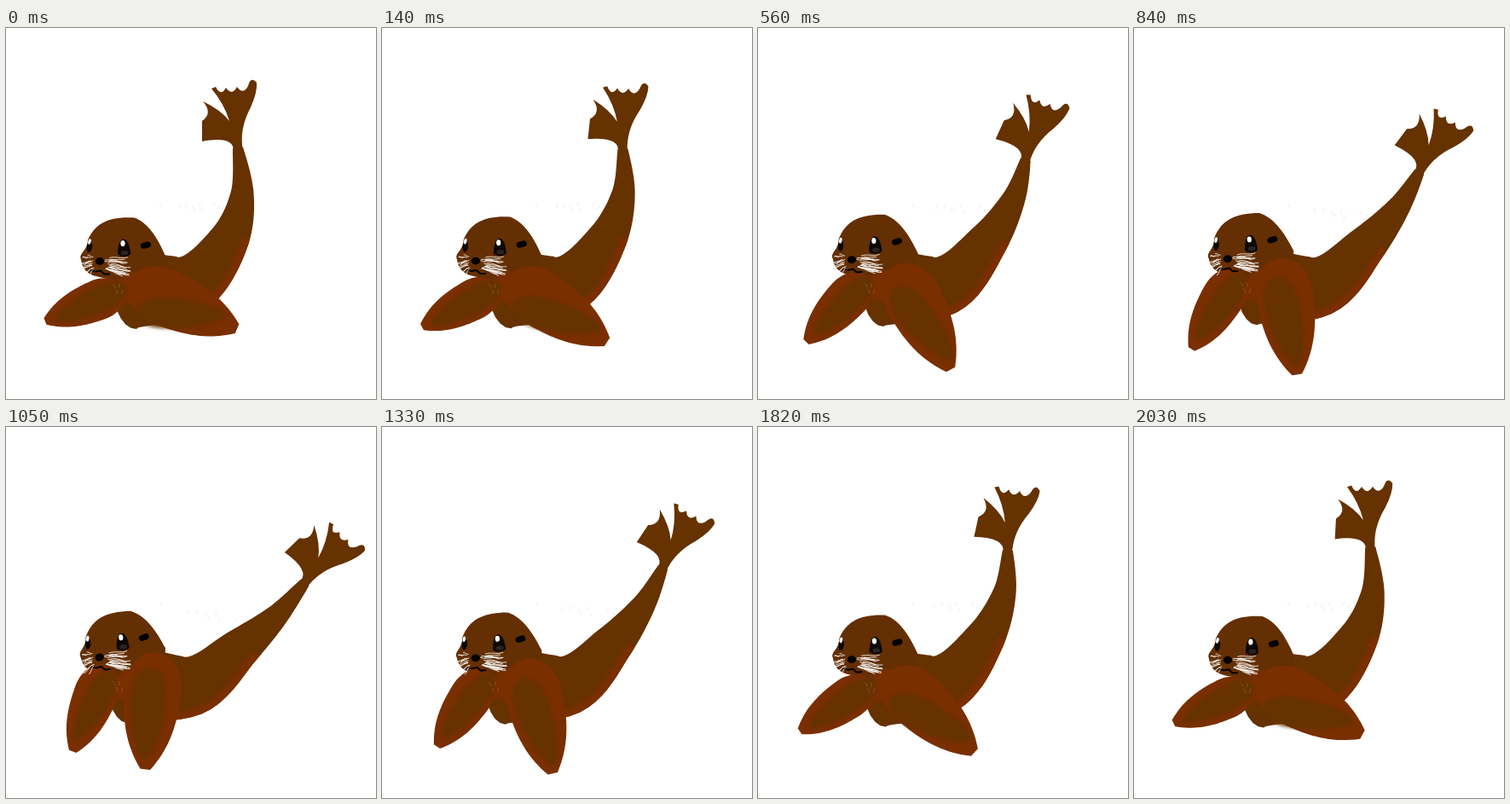
Recreate the animation shown at these times as an HTML page with a canvas. Size 434 px wide and 435 px high, loop 2.1 s.

```html
<!DOCTYPE html>
<html lang="en">
<head>
<meta charset="utf-8">
<title>Seal</title>
<style>
html, body { margin: 0; width: 100%; height: 100%; overflow: hidden; background: #fff; }
canvas { display: block; }
</style>
</head>
<body>
<canvas id="stage" width="434" height="435"></canvas>
<script>
const ctx = document.getElementById('stage').getContext('2d');
const STEP = 70, COUNT = 30, MID = 8 / 15, RAD = Math.PI / 180;
const DARK = '#653200', RED = '#7a2f00', HEAD = '#642f03';

// Centre line from tail stem to chest: raised, halfway, lowered.
const spines = [
  [[272,140], [277,195], [261,249], [217,300], [150,306]],
  [[314,154], [300,200], [269,251], [220,301], [147,303]],
  [[351,182], [317,222], [274,260], [219,303], [145,300]]
];

const lerp = (a, b, t) => a + (b - a) * t;

function spineAt(u) {
  const w = [(u - MID) * (u - 1) / MID, u * (u - 1) / (MID * (MID - 1)), u * (u - MID) / (1 - MID)];
  return spines[0].map((p, i) => [0, 1].map(k => w.reduce((sum, v, j) => sum + v * spines[j][i][k], 0)));
}

// Point on a Catmull-Rom curve, t from 0 to 1.
function along(p, t) {
  const n = p.length - 1, i = Math.min(n - 1, Math.floor(t * n)), f = t * n - i;
  const b = p[i], c = p[i + 1], a = p[Math.max(0, i - 1)], d = p[Math.min(n, i + 2)];
  return [0, 1].map(k => b[k] + f / 2 * (c[k] - a[k] +
    f * (2 * a[k] - 5 * b[k] + 4 * c[k] - d[k] + f * (3 * (b[k] - c[k]) + d[k] - a[k]))));
}

function polygon(points) {
  const path = new Path2D();
  points.forEach(p => path.lineTo(p[0], p[1]));
  path.closePath();
  return path;
}

function fill(path, color, blur = 0.7) {
  ctx.filter = blur ? `blur(${blur}px)` : 'none';
  ctx.fillStyle = color;
  ctx.fill(path);
  ctx.filter = 'none';
}

function oval(x, y, rx, ry, color, turn = 0) {
  ctx.fillStyle = color;
  ctx.beginPath();
  ctx.ellipse(x, y, rx, ry, turn, 0, 7);
  ctx.fill();
}

function line(color, width, points) {
  ctx.strokeStyle = color;
  ctx.lineWidth = width;
  ctx.beginPath();
  points.forEach(p => ctx.lineTo(p[0], p[1]));
  ctx.stroke();
}

function random(seed) {
  return () => (seed = seed * 16807 % 2147483647) / 2147483647;
}

function drawBody(spine) {
  const belly = [], back = [], cap = [];
  for (let i = 0; i <= 40; i++) {
    const t = i / 40, c = along(spine, t);
    const a = along(spine, Math.max(0, t - 0.01)), b = along(spine, Math.min(1, t + 0.01));
    const d = Math.hypot(b[0] - a[0], b[1] - a[1]), tx = (b[0] - a[0]) / d, ty = (b[1] - a[1]) / d;
    const r = 6 + 41 * t ** 1.2;
    belly.push([c[0] + ty * r, c[1] - tx * r]);
    back.unshift([c[0] - ty * r, c[1] + tx * r]);
    if (i === 40) {
      for (let k = 1; k < 12; k++) {
        const side = r * Math.cos(k * Math.PI / 12), out = 25 * Math.sin(k * Math.PI / 12);
        cap.push([c[0] + ty * side + tx * out, c[1] - tx * side + ty * out]);
      }
    }
  }
  const shape = polygon([...belly, ...cap, ...back]);
  fill(shape, DARK);

  // Reddish rim under the belly.
  ctx.save();
  ctx.clip(shape);
  ctx.filter = 'blur(2px)';
  line(RED, 19, belly.slice(18, 34));
  ctx.restore();
}

function drawFluke(spine, u) {
  ctx.save();
  ctx.translate(...spine[0]);
  ctx.rotate(46 * RAD * u);
  ctx.translate(-272, -140);
  const path = new Path2D();
  path.moveTo(267, 144);
  path.quadraticCurveTo(267, 126, 230, 133);
  path.lineTo(230, 109);
  path.quadraticCurveTo(243, 100, 231, 86);
  path.quadraticCurveTo(252, 96, 262, 109);
  path.quadraticCurveTo(256, 89, 241, 71);
  path.lineTo(246, 69);
  for (let i = 1; i <= 3; i++) path.quadraticCurveTo(239 + i * 13, 82 - i, 245 + i * 13, 71 - i);
  path.quadraticCurveTo(287, 56, 294, 64);
  path.quadraticCurveTo(295, 75, 287, 93);
  path.quadraticCurveTo(273, 119, 278, 144);
  fill(path, DARK);
  ctx.restore();
}

// Rounded at the root, widest early, blunt at the tip.
function leaf(x, y, angle, length, width, color, blur) {
  const upper = [], lower = [], cos = Math.cos(angle * RAD), sin = Math.sin(angle * RAD);
  for (let i = 0; i <= 30; i++) {
    const s = lerp(-0.05, 1, i / 30);
    const root = Math.sqrt(1 - Math.max(0, 1 - (s + 0.05) / 0.35) ** 2);
    const r = width * root * (1 - 0.83 * Math.max(0, s) ** 3.5);
    const cx = x + cos * s * length, cy = y + sin * s * length;
    upper.push([cx + sin * r, cy - cos * r]);
    lower.unshift([cx - sin * r, cy + cos * r]);
  }
  fill(polygon([...upper, ...lower]), color, blur);
}

function drawFins(u) {
  leaf(135 - 18 * u, 308 - 24 * u, 158 - 46 * u, 96 + 8 * u, 24 + 2 * u, RED);
  const chest = new Path2D();
  chest.ellipse(148, 304 - 3 * u, 24, 17, -0.4, 0, 7);
  fill(chest, RED, 2);
  leaf(150 + 26 * u, 300 - 30 * u, 23.5 + 72 * u, 132, 34, RED);
  leaf(138 - 15 * u, 305 - 15 * u, 155 - 36 * u, 88, 15, DARK, 2);
  leaf(155 + 14 * u, 333 - 46 * u, 2 + 92 * u, 102, 18 + 3 * u, DARK, 2);
}

function tilted(u, paint) {
  ctx.save();
  ctx.translate(70, 275.5);
  ctx.rotate(-0.087 * u);
  ctx.translate(-70, -276);
  paint();
  ctx.restore();
}

function drawHead() {
  const path = new Path2D();
  path.moveTo(88, 272);
  path.bezierCurveTo(85, 264, 95, 263, 96, 249);
  path.bezierCurveTo(105, 229, 121, 221, 151, 223);
  path.bezierCurveTo(169, 230, 180, 251, 188, 270);
  path.bezierCurveTo(186, 296, 160, 302, 130, 297);
  path.bezierCurveTo(112, 291, 91, 295, 88, 272);
  fill(path, HEAD);
}

function whiskers(x, dir, reach, count, seed) {
  const rnd = random(seed);
  for (let i = 0; i < count; i++) {
    const sx = x + dir * rnd() * 9, sy = 268 + rnd() * 17;
    const len = reach * lerp(0.4, 0.9, rnd()), drop = (sy - 274) * 0.5 + rnd() * 4;
    const bend = lerp(-5, 5, rnd());
    ctx.beginPath();
    ctx.moveTo(sx, sy);
    ctx.bezierCurveTo(sx + dir * len * 0.35, sy + bend, sx + dir * len * 0.6, sy + drop - bend,
      sx + dir * len, sy + drop);
    ctx.stroke();
  }
}

function drawFace() {
  const eye = new Path2D();
  eye.moveTo(131, 266);
  eye.bezierCurveTo(131, 242, 145, 242, 146, 266);
  eye.quadraticCurveTo(139, 271, 131, 266);
  fill(eye, '#0c0805', 0.4);
  oval(139, 264, 4.5, 2.6, '#2b2320');
  oval(137, 253, 2.6, 3.5, '#fff');

  oval(98, 257, 3.2, 6.5, '#0c0805', 0.15);
  oval(98, 251, 1.7, 3.4, '#fff', 0.2);

  ctx.lineCap = 'round';
  line('#000', 7, [[161.5, 255.8], [166.5, 254.5]]);
  oval(110, 274, 5.2, 4.4, '#060302');
  line('#000', 2, [[99, 284], [105, 286], [111, 285], [115, 289], [121, 289]]);

  ctx.strokeStyle = '#fff';
  ctx.lineWidth = 0.8;
  whiskers(116, 1, 29, 20, 71);
  whiskers(103, -1, 13, 13, 29);
}

function drawSpecks(spine) {
  const rnd = random(5), [x, y] = spine[1];
  for (let i = 0; i < 12; i++) {
    const t = Math.sqrt(rnd()) * 0.8;
    const px = lerp(180, x, t), py = lerp(210, y + 12, t) + rnd() * 22 * t;
    line('#e2e2e2', 0.7, [[px, py], [px + 2, py - 4]]);
  }
}

function drawScratches(u) {
  for (let i = 0; i < 4; i++) {
    const x = 125 + i * 4, y = 300 + i % 2 * 7 - u * 2;
    line('rgba(190,140,95,.5)', 0.7, [[x, y], [x + 4 - i * 2, y + 5]]);
  }
}

function draw(u) {
  const spine = spineAt(u);
  ctx.fillStyle = '#fff';
  ctx.fillRect(0, 0, 434, 435);
  drawSpecks(spine);
  drawBody(spine);
  drawFluke(spine, u);
  tilted(u, drawHead);
  drawFins(u);
  drawScratches(u);
  tilted(u, drawFace);
}

const start = performance.now();
let last = -1;
function tick() {
  const k = Math.floor((performance.now() - start) / STEP) % COUNT;
  if (k !== last) {
    last = k;
    draw(1 - Math.abs(k - 15) / 15);
  }
  requestAnimationFrame(tick);
}
tick();
</script>
</body>
</html>
```
